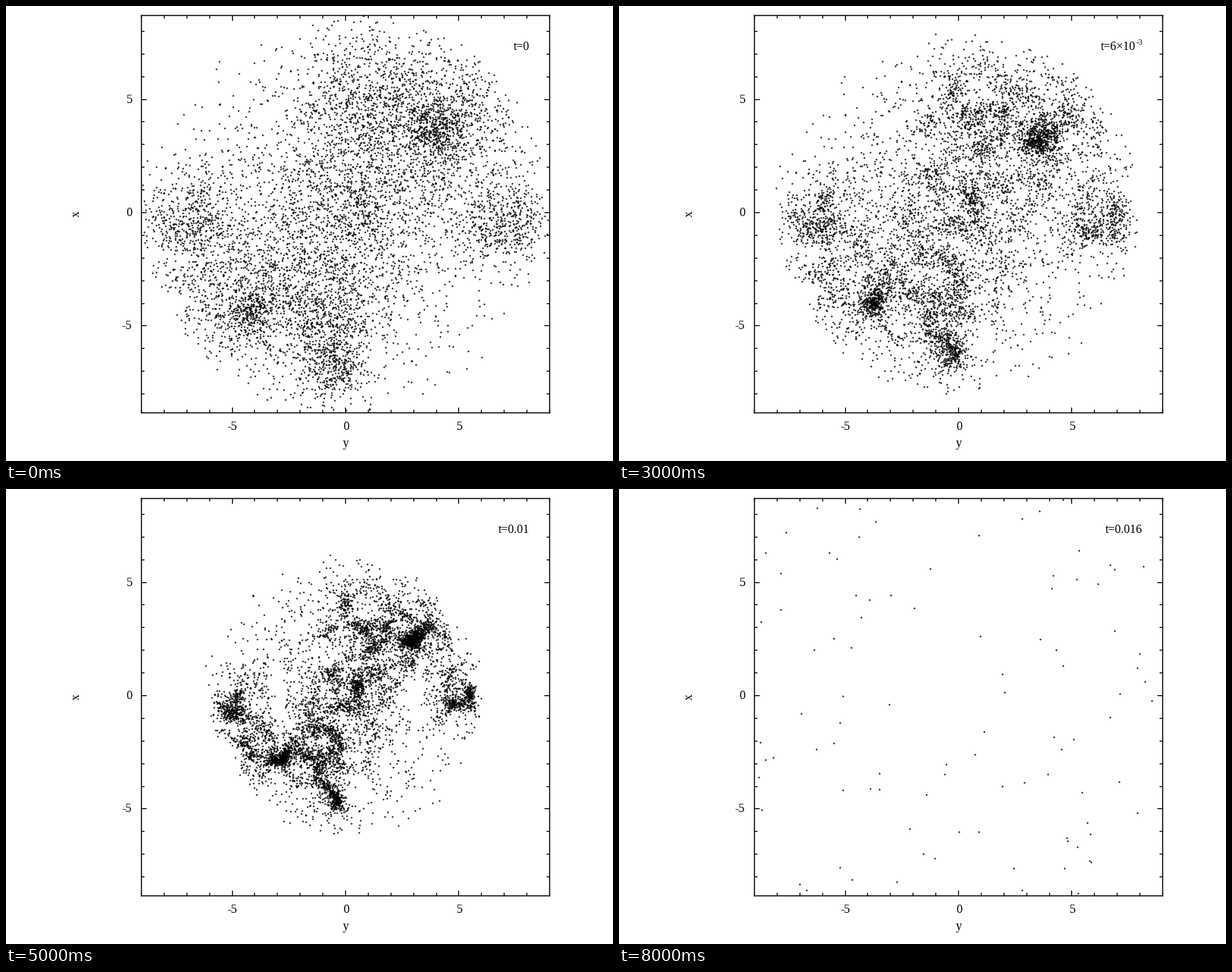
A matplotlib script that plays this animation: 800 px wide and 600 px high, repeating every 9000 ms.

```python
import numpy as np
import matplotlib.pyplot as plt
from matplotlib.animation import FuncAnimation
from matplotlib.ticker import MultipleLocator, NullFormatter

W, H = 800, 600
PT = 0.72               # points per pixel at 100 dpi
LEFT, RIGHT, TOP, BOTTOM = 178, 716, 12, 536
X0, Y0 = 447, 272
UNIT = (RIGHT - LEFT) / 18
FALL_TIME = 15.4        # free-fall time, in units of 0.001
RADIUS = 9.05

rng = np.random.default_rng(12)

# Overdense patches at the start: x, y, spread
PATCHES = [
    (3.9, 3.7, .6), (4.2, 3.8, 1.6), (1, 4.8, 1.5), (-4.2, -4.4, .5),
    (-4.2, -3.5, 1.6), (-.8, -4.2, 1.4), (-6.8, -.4, 1.1), (.2, .3, 1.8),
    (7, -.4, 1.1), (-.5, -6.8, .8),
]
# Ridge on which the matter ends up, and the knots along it
RIDGE = np.array([(-4.1, -.9), (-3, -1.8), (-1.6, -1.8), (-.5, -.8), (.6, .3),
                  (1.4, 1.3), (2.7, 1.9), (3.5, 1.1), (4.3, .25)])
KNOTS = RIDGE[[1, 2, 6]]


def start_cloud():
    """A ball seen from the side, thin off the diagonal, plus patches."""
    ball = rng.uniform(-RADIUS, RADIUS, (6000, 3))
    x, y = ball[np.linalg.norm(ball, axis=1) < RADIUS, :2].T
    keep = rng.random(len(x)) < np.exp(-(x - y) ** 2 / 90)
    parts = [np.column_stack([x, y])[keep]]
    for x, y, spread in PATCHES:
        parts.append(rng.normal((x, y), spread, (int(430 * spread), 2)))
    cloud = np.concatenate(parts)
    return cloud[np.hypot(*cloud.T) < RADIUS]


def clump(q, reach, force):
    """Move points to the local centre of mass, most where it is dense."""
    a = q[::5]
    d2 = (q ** 2).sum(1)[:, None] + (a ** 2).sum(1) - 2 * q @ a.T
    w = np.exp(-d2 / (2 * reach ** 2))
    mass = w.sum(axis=1, keepdims=True)
    return q + force * mass / (mass + np.median(mass)) * (w @ a / mass - q)


def pull(q, goal, reach, force):
    gap = goal - q
    near = np.exp(-(gap ** 2).sum(axis=1) / (2 * reach ** 2))
    return q + force * near[:, None] * gap


def nearest(q, points):
    d2 = ((q[:, None] - points) ** 2).sum(axis=2)
    return points[d2.argmin(axis=1)]


def scale(t):
    """Radius of a freely falling sphere relative to its start."""
    th = np.linspace(0, np.pi / 2, 400)
    time = (th + np.sin(2 * th) / 2) / (np.pi / 2) * FALL_TIME
    return np.interp(t, time, np.cos(th) ** 2)


# Shapes of the cloud at t = 0, 8 and 12 with the overall infall divided out
early = clump(start_cloud(), .6, .5)
mid = early * scale(8)
for _ in range(3):
    mid = clump(mid, .4, 1)

steps = np.linspace(0, len(RIDGE) - 1, 81)
ridge = np.column_stack([np.interp(steps, range(len(RIDGE)), c) for c in RIDGE.T])
late = mid * scale(12) / scale(8)
late = pull(late, nearest(late, ridge), 1.6, .75)
late = pull(late, nearest(late, KNOTS), .8, .45)
late += rng.normal(0, .17, late.shape)

mid, late = mid / scale(8), late / scale(12)
heat = rng.normal(0, .2, early.shape)
ejected = rng.uniform((-9, -8.84), (9, 8.69), (95, 2))


def cloud_at(t):
    if t > FALL_TIME:
        return ejected
    u = (t / 8) ** 2
    if u <= 1:
        shape = early + u * (mid - early)
    else:
        shape = mid + min((u - 1) / 1.25, 1) * (late - mid)
    return shape * scale(t) + max(t - 12, 0) / 2 * heat


fig = plt.figure(figsize=(W / 100, H / 100), dpi=100, facecolor="white")
ax = fig.add_axes([LEFT / W, 1 - BOTTOM / H, (RIGHT - LEFT) / W, (BOTTOM - TOP) / H])
ax.set_xlim((LEFT - X0) / UNIT, (RIGHT - X0) / UNIT)
ax.set_ylim((Y0 - BOTTOM) / UNIT, (Y0 - TOP) / UNIT)
for axis in (ax.xaxis, ax.yaxis):
    axis.set_major_locator(MultipleLocator(5))
    axis.set_minor_locator(MultipleLocator(1))
    axis.set_major_formatter(NullFormatter())
ax.tick_params(which="both", direction="in", top=True, right=True, width=1.3 * PT)
ax.tick_params(which="major", length=7 * PT)
ax.tick_params(which="minor", length=4 * PT)
for spine in ax.spines.values():
    spine.set_linewidth(1.4 * PT)


def label(x, y, text, size=16, ha="center", **kw):
    return fig.text(x / W, 1 - y / H, text, fontsize=size * PT, ha=ha,
                    family="Liberation Serif", **{"va": "baseline", **kw})


for v in (-5, 0, 5):
    label(X0 + 1 + v * UNIT, 559, str(v))
    label(166, Y0 - v * UNIT + 5, str(v), ha="right")
label(448, 581, "y")
label(93, 274, "x", rotation=90, va="center")
clock = label(690, 58, "", ha="right")
power = label(690, 51, "", size=10.5, ha="right")

dots, = ax.plot([], [], "o", color="black", ms=2.1 * PT, mew=0)


def update(i):
    t = 2 * i
    small = 0 < t < 10
    clock.set_text(f"t={t}×10" if small else f"t={t / 1000:g}")
    clock.set_x((681 if small else 690) / W)
    power.set_text("-3" if small else "")
    dots.set_data(*cloud_at(t).T)
    return dots, clock, power


anim = FuncAnimation(fig, update, frames=9, interval=1000, repeat=True,
                     repeat_delay=0, blit=False)
plt.show()
```
